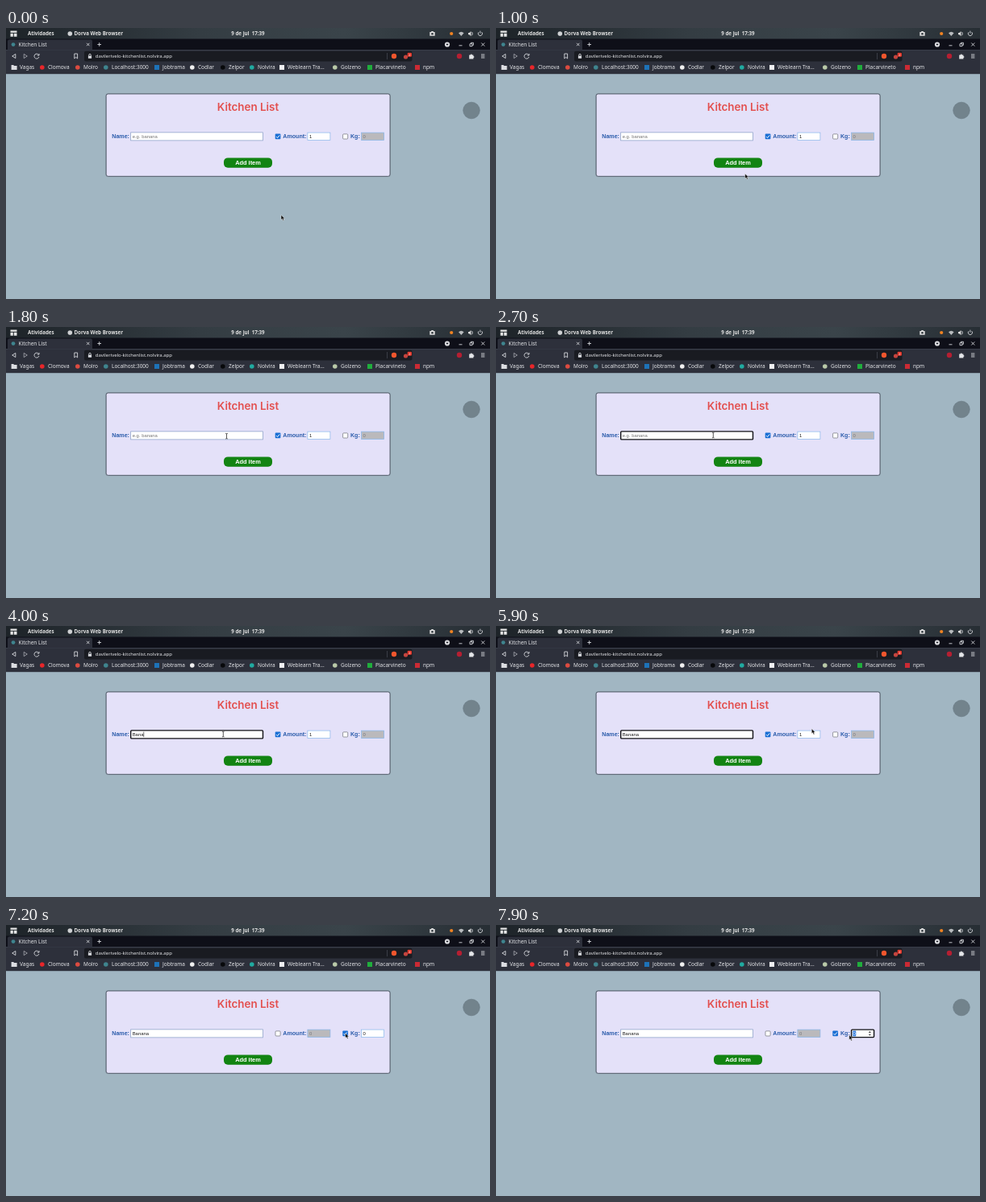
An HTML page that plays this animation: 600 by 337 pixels, repeating every 8 s.

```html
<!DOCTYPE html>
<html lang="en">
<head>
<meta charset="utf-8">
<title>Kitchen List</title>
<style>
  html, body { margin: 0; width: 100%; height: 100%; overflow: hidden; background: #a1b6c2; }
  svg { display: block; width: 600px; height: 337px; }
  text { white-space: pre; }
  .ui { font: 6.5px "Noto Sans", sans-serif; fill: #e4e5e8; }
  .bar { font: bold 6.2px "Noto Sans", sans-serif; fill: #e2e2e2; }
  .url { font-size: 5.95px; }
  .head { font: 600 13.4px Inter, "Noto Sans", sans-serif; fill: #e3504f; text-anchor: middle; }
  .label { font: bold 7.1px "Liberation Sans", Arial, sans-serif; fill: #2b5cab; }
  .field { font: 5.9px "Liberation Sans", Arial, sans-serif; fill: #1c1c1c; }
  .button { font: bold 7.4px "Liberation Sans", Arial, sans-serif; fill: #fff; text-anchor: middle; }
  .line { fill: none; stroke: #d5d7dc; stroke-width: .9; }
</style>
</head>
<body>
<svg viewBox="0 0 600 337">
  <defs>
    <linearGradient id="top">
      <stop offset="0" stop-color="#1d2328"/><stop offset=".4" stop-color="#343d43"/>
      <stop offset=".7" stop-color="#3a444a"/><stop offset="1" stop-color="#272e34"/>
    </linearGradient>
  </defs>

  <!-- desktop bar -->
  <rect width="600" height="14" fill="url(#top)"/>
  <path d="M5.5 3.5h8v2.2h-8zM5.5 6.7h3.3v4H5.5zM9.8 6.7h3.7v4H9.8z" fill="#e6e6e6"/>
  <text class="bar" x="27" y="9.3">Atividades</text>
  <circle cx="79.3" cy="7" r="2.8" fill="#cfd1d3"/>
  <text class="bar" x="84.5" y="9.3">Dorva Web Browser</text>
  <text class="bar" x="279.3" y="9.3">9 de jul  17:39</text>
  <path d="M525.3 5h1.5l.7-1h2l.7 1h1.5v4.8h-6.4z" fill="#dcdcdc"/>
  <circle cx="528.5" cy="7.3" r="1.3" fill="#2f373d"/>
  <circle cx="552.2" cy="7" r="2.1" fill="#f08322"/>
  <path d="M561 6.2q3.3-3 6.6 0L564.3 10z" fill="#b9bcbf"/>
  <path d="M573 6h1.4l2-2v6.2l-2-2H573z" fill="#dcdcdc"/>
  <path class="line" d="M577.6 5q1.5 2 0 4.2M586 5.2a2.6 2.6 0 1 0 3.8 0M587.9 3.6v3"/>

  <!-- tabs -->
  <rect y="13.5" width="600" height="14" fill="#0e0f18"/>
  <path d="M2 27.5V16.5q0-2 2-2H105q2 0 2 2v11z" fill="#2d303b"/>
  <circle cx="9" cy="20.6" r="2.4" fill="#3f848e"/>
  <text class="ui" x="15.5" y="22.9">Kitchen List</text>
  <path class="line" d="M100 18.8l3.4 3.4M103.4 18.8l-3.4 3.4M113.4 20.5h4.6M115.7 18.2v4.6"/>
  <circle cx="547" cy="20.5" r="3.1" fill="#e0e1e4"/>
  <path d="M545.3 19.7h3.4l-1.7 2z" fill="#0e0f18"/>
  <path class="line" d="M561.5 21.8h4M575 19.7h3v3h-3zM576.4 19.5v-1.2h3v3h-1.2M589.3 18.5l4 4M593.3 18.5l-4 4"/>

  <!-- toolbar -->
  <rect y="27.3" width="600" height="30.2" fill="#2d303b"/>
  <rect x="97" y="28.8" width="406.5" height="12.6" rx="2" fill="#191b21"/>
  <path class="line" d="M11.8 32.4v5.2L7.7 35zM40.6 33.6a3 3 0 1 0 .3 2.4M41 31.9v2.2h-2.3M84.8 32h3.8v6l-1.9-1.6-1.9 1.6z"/>
  <path class="line" d="M22.2 32.4v5.2l4.1-2.6z" opacity=".65"/>
  <rect x="101.9" y="34.5" width="4.2" height="3.3" fill="#d5d7dc"/>
  <path class="line" d="M102.7 34.6v-1a1.3 1.3 0 0 1 2.6 0v1"/>
  <text class="ui url" x="110.8" y="37.2">davilerivelo-kitchenlist.nolvira.app</text>
  <path d="M472.5 31v8.2" stroke="#4a4d57" stroke-width=".7"/>
  <circle cx="481" cy="35" r="3.2" fill="#f0562d"/>
  <circle cx="495.5" cy="36" r="2.6" fill="#c4453f"/>
  <rect x="497.6" y="30.8" width="5.4" height="5" rx="1.2" fill="#e2382c"/>
  <text x="500.3" y="34.8" text-anchor="middle" font-family="Noto Sans, sans-serif" font-size="4" fill="#fff">2</text>
  <circle cx="562" cy="35" r="3.2" fill="#b51f32"/>
  <path d="M574.2 33.4h1.6a1 1 0 1 1 2 0h1.6v1.6a1 1 0 1 1 0 2v1.5h-5.2z" fill="#e4e5e8"/>
  <path class="line" d="M589 33h4.4M589 35h4.4M589 37h4.4"/>

  <!-- bookmarks -->
  <path d="M6.6 46h2.6l.9 1h3.5v5h-7z" fill="#dcdde1"/>
  <g id="marks"></g>

  <!-- page -->
  <rect y="57.4" width="600" height="280" fill="#a1b6c2"/>
  <circle cx="577" cy="102.5" r="10.3" fill="#72838c" stroke="#697983" stroke-width=".6"/>
  <rect x="123.4" y="81.2" width="353.4" height="104" rx="3" fill="#5a6672" opacity=".4"/>
  <rect x="124.2" y="82" width="351.8" height="102.4" rx="2.5" fill="#e4e1f9" stroke="#434c5a" stroke-width=".8"/>
  <text class="head" x="300" y="103">Kitchen List</text>
  <text class="label" x="131.3" y="137.4">Name:</text>
  <text class="label" x="343.3" y="137.4">Amount:</text>
  <text class="label" x="427" y="137.4">Kg:</text>
  <rect x="270" y="161.4" width="60" height="12.4" rx="5" fill="#128412"/>
  <text class="button" x="300" y="170.2">Add item</text>

  <rect id="nameBox" x="154.7" y="129.9" width="163.8" height="10"/>
  <text id="name" class="field" x="156.7" y="137.1"></text>
  <path id="caret" d="M0 131.6v6.5" stroke="#111" stroke-width=".6"/>

  <g id="amountCheck" transform="translate(333.7 131.6)"></g>
  <g id="kgCheck" transform="translate(417.3 131.6)"></g>
  <rect id="amountBox" x="373.9" y="130.1" width="28" height="9.5"/>
  <text id="amount" class="field" x="375.9" y="137.1"></text>
  <rect id="kgBox" x="440.6" y="130.1" width="28" height="9.5"/>
  <rect id="pick" x="442.3" y="131.6" width="4" height="6.7" fill="#2b78dc"/>
  <text id="kg" class="field" x="442.6" y="137.1">0</text>
  <path id="spin" d="M461.8 134.1l1.6-2 1.6 2zM461.8 135.7l1.6 2 1.6-2z" fill="#444"/>

  <path id="arrow" d="M0 0v6l1.4-1.2 1 2.3 1.2-.5-1-2.2h1.9z" fill="#0a0a0a" stroke="#fff" stroke-width=".45"/>
  <path id="beam" d="M-1.3-3.3q1.3 0 1.3.6 0-.6 1.3-.6M0-2.7v5.4M-1.3 3.3q1.3 0 1.3-.6 0 .6 1.3.6" fill="none" stroke="#111" stroke-width=".7"/>
</svg>
<script>
const $ = id => document.getElementById(id);

// text x, label, icon colour
const marks = [
  [17, "Vagas"], [52, "Clomova", "#e8262a"], [96, "Molro", "#dc4b40"],
  [131, "Localhost:3000", "#3f848e"], [194, "Jobtrama", "#1d72b8"],
  [238, "Codlar", "#f0f0f0"], [276, "Zelpor", "#08090b"], [312, "Nolvira", "#20aaa0"],
  [349, "Weblearn Tra...", "#f0f0f2"], [415, "Golzeno", "#b9c9a8"],
  [458, "Placarvineto", "#20ad3c"], [517, "npm", "#cb2a34"]
];
const squares = ["Jobtrama", "Weblearn Tra...", "Placarvineto", "npm"];
$("marks").innerHTML = marks.map(([x, label, color]) => {
  const icon = !color ? "" : squares.includes(label)
    ? `<rect x="${x - 10}" y="46" width="6" height="6" fill="${color}"/>`
    : `<circle cx="${x - 7.2}" cy="49" r="2.8" fill="${color}"/>`;
  return `${icon}<text class="ui" x="${x}" y="51.4">${label}</text>`;
}).join("");

const tick = `<rect width="6.7" height="6.7" rx="1" fill="#1a6fd4"/>
  <path d="M1.3 3.5l1.5 1.5 2.7-3.2" fill="none" stroke="#fff"/>`;
const blank = `<rect x=".3" y=".3" width="6.1" height="6.1" rx="1" fill="#fff" stroke="#6f7078" stroke-width=".7"/>`;

const LOOP = 8000, STEP = 100, FOCUS = 2200, SWITCH = 7000, PICK = 7700;

// time, x, y of the pointer
const path = [
  [600, 341, 232.5], [1000, 308.7, 181.2], [1500, 285, 160], [1800, 273.5, 135.7],
  [2200, 269.3, 134.5], [5500, 269.3, 134.5], [5900, 391.3, 127.8],
  [6400, 420.6, 134.5], [7300, 420.6, 134.5], [7600, 447, 137], [7900, 437.8, 136.8]
];
const typed = [[0, ""], [3300, "B"], [3700, "Ba"], [3800, "Ban"], [4000, "Bana"], [4700, "Banana"]];
const caretOn = [[FOCUS, 2700], [3200, 4500], [4700, 5300]];

function pointer(t) {
  const i = path.findIndex(p => p[0] > t);
  if (i === 0) return path[0].slice(1);
  if (i < 0) return path[path.length - 1].slice(1);
  const [a, ax, ay] = path[i - 1], [b, bx, by] = path[i];
  const k = (t - a) / (b - a);
  return [ax + (bx - ax) * k, ay + (by - ay) * k];
}

const show = (id, on) => $(id).setAttribute("visibility", on ? "visible" : "hidden");

function paint(id, attrs) {
  for (const key in attrs) $(id).setAttribute(key, attrs[key]);
}

function frame(id, focused, enabled, edge) {
  paint(id, {
    fill: enabled ? "#fff" : "#bab9bc",
    stroke: focused ? "#101014" : edge,
    "stroke-width": focused ? 1.4 : 0.7,
    rx: focused ? 1 : 0
  });
}

function draw(t) {
  const kgOn = t >= SWITCH, picked = t >= PICK;
  const word = typed.filter(s => s[0] <= t).pop()[1];
  const name = $("name");
  name.textContent = word || "e.g. banana";
  name.style.fill = word ? "#1c1c1c" : "#757575";
  frame("nameBox", t >= FOCUS && !kgOn, true, "#8299c4");

  const end = word ? name.getComputedTextLength() : 0;
  $("caret").setAttribute("transform", `translate(${157 + end} 0)`);
  show("caret", caretOn.some(([a, b]) => t >= a && t < b));

  $("amountCheck").innerHTML = kgOn ? blank : tick;
  $("kgCheck").innerHTML = kgOn ? tick : blank;
  frame("amountBox", false, !kgOn, "#86b5ea");
  frame("kgBox", picked, kgOn, "#86b5ea");
  $("amount").textContent = kgOn ? "0" : "1";
  $("amount").style.fill = kgOn ? "#77777a" : "#1c1c1c";
  $("kg").style.fill = picked ? "#fff" : kgOn ? "#1c1c1c" : "#77777a";
  show("pick", picked);

  const [x, y] = pointer(t);
  const inside = (a, b) => x > a && x < b && y > 130 && y < 140;
  const overKg = kgOn && inside(441, 469);
  const beam = inside(155, 318) || inside(374, 402) && !kgOn || overKg;
  show("spin", picked || overKg);
  show("beam", beam);
  show("arrow", !beam);
  $(beam ? "beam" : "arrow").setAttribute("transform", `translate(${x} ${y})`);
}

const start = performance.now();
function run(now) {
  const t = Math.max(0, now - start) % LOOP;
  draw(Math.floor(t / STEP) * STEP);
  requestAnimationFrame(run);
}
draw(0);
requestAnimationFrame(run);
</script>
</body>
</html>
```
